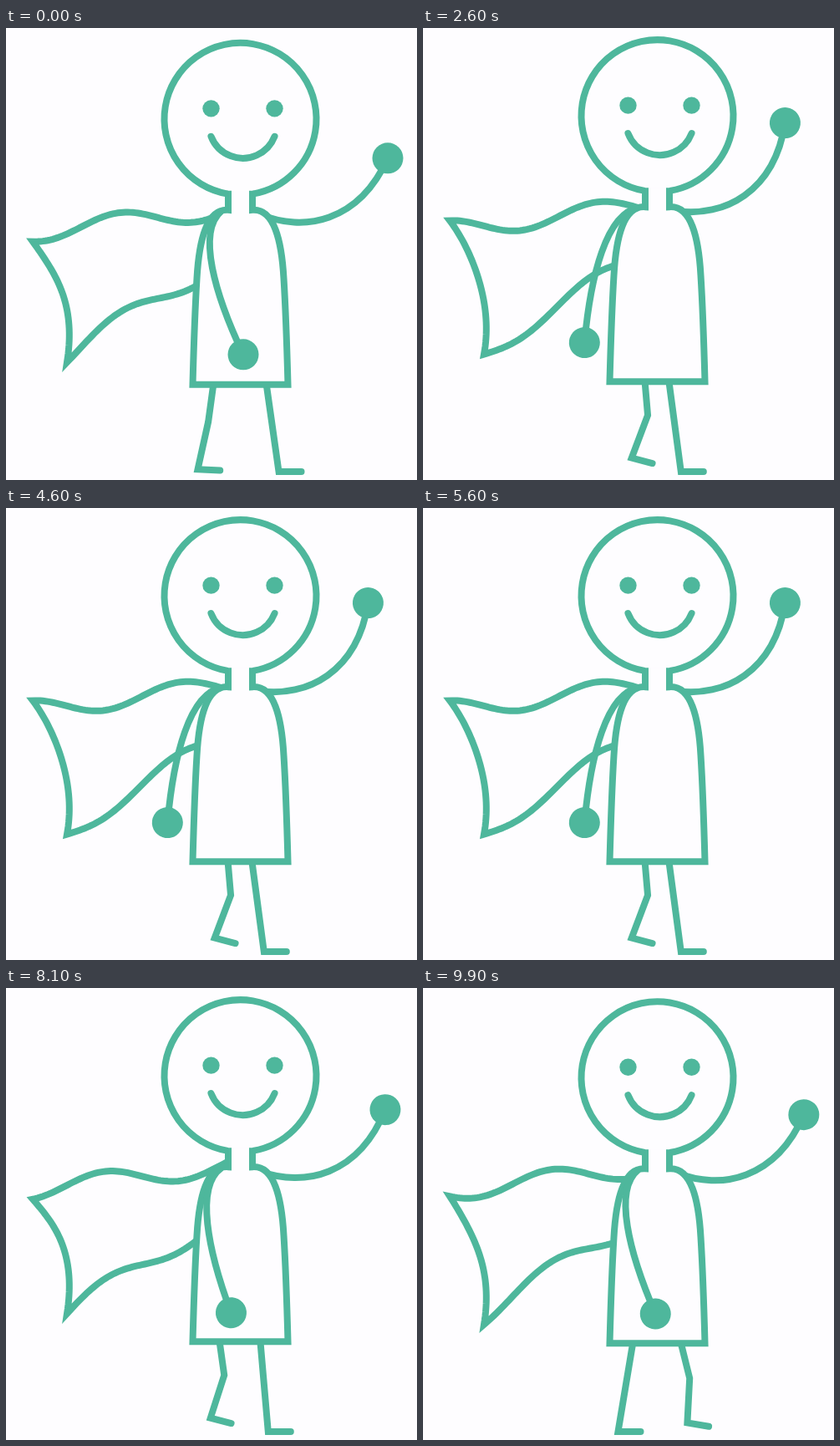
Recreate the animation shown at these times as an HTML page with a canvas. Size 492 by 541 pixels, loop 10000 ms.

```html
<!DOCTYPE html>
<html lang="en">
<head>
<meta charset="utf-8">
<title>Walking hero</title>
<style>
html, body { margin: 0; width: 100%; height: 100%; overflow: hidden; background: #fefdff; }
canvas { display: block; width: 492px; height: 541px; }
</style>
</head>
<body>
<canvas id="stage" width="492" height="541"></canvas>
<script>
const ctx = document.getElementById('stage').getContext('2d');
const INK = '#4eb79c', PAPER = '#fefdff';
const STEP = 100, CYCLE = 1000;
const { PI, cos, sin, max } = Math;
const rad = deg => deg * PI / 180;

function stroke(path, cap = 'butt') {
  ctx.lineCap = cap;
  ctx.stroke(path);
}

function dot(x, y, r) {
  ctx.beginPath();
  ctx.arc(x, y, r, 0, 2 * PI);
  ctx.fill();
}

function polyline(points) {
  const path = new Path2D();
  points.forEach(([x, y]) => path.lineTo(x, y));
  return path;
}

function cubic(a, b, c, d, t) {
  const u = 1 - t;
  return u * u * u * a + 3 * u * u * t * b + 3 * u * t * t * c + t * t * t * d;
}

const torso = new Path2D(
  'M266 195 V218 C240 216 231 255 228.5 300 C226 340 224.5 390 223.5 427 ' +
  'H337.5 C336.5 390 335 340 332.5 300 C330 255 321 216 295 218 V195');
const leftArm = new Path2D('M0 0 C-30 25 -8 100 26 172');
const rightArm = new Path2D('M0 0 C52 22 118 10 153 -67');

// Resting outline of the cape: top edge, left edge, bottom edge
const cape = [];
for (let x = 266; x > 32; x -= 3) cape.push([x, 245.5 - 0.125 * (x - 32)]);
for (let i = 0; i < 40; i++) {
  const t = i / 40;
  cape.push([cubic(32, 56, 85, 73, t), cubic(245.5, 275, 325, 394, t)]);
}
for (let x = 73; x <= 241; x += 3) {
  const u = (x - 73) / 153;
  cape.push([x, 394 - 95.5 * u - 12 * u * (1 - u)]);
}

function drawCape(angle) {
  stroke(polyline(cape.map(([x, y]) =>
    [x, y + 11.3 * cos(angle - rad(33 - 1.98 * (x - 32)))])));
}

function drawLeg(angle, bob, hipShift, footShift) {
  const swing = max(0, sin(angle));
  const c = cos(angle);
  const hip = [275 - 27 * c + hipShift, 427 + bob];
  const heel = [
    275 - 47 * c + 10 * swing * c - 2 * swing + footShift,
    531 - 24.5 * swing ** 1.1
  ];
  const knee = [
    hip[0] + 0.44 * (heel[0] - hip[0]) + 15 * swing,
    hip[1] + 0.44 * (heel[1] - hip[1])
  ];
  const tilt = rad(21 * swing);
  const length = 27 - 2 * swing;
  const toe = [heel[0] + length * cos(tilt), heel[1] + length * sin(tilt)];
  stroke(polyline([hip, knee, heel, toe]), 'round');
}

function drawArm(path, x, y, turn, handX, handY) {
  ctx.save();
  ctx.translate(x, y);
  ctx.rotate(turn);
  stroke(path);
  dot(handX, handY, 18.5);
  ctx.restore();
}

function drawHead() {
  const head = new Path2D();
  const gap = 0.166;
  head.arc(280.5, 109, 91, PI / 2 + gap, PI * 2.5 - gap);
  stroke(head);
  dot(245.5, 96.5, 10.2);
  dot(321.5, 96.5, 10.2);
  const smile = new Path2D();
  smile.arc(283.5, 115.2, 40.8, 0.37, PI - 0.37);
  stroke(smile, 'round');
}

function draw(time) {
  const angle = 2 * PI * (time % CYCLE) / CYCLE + rad(8);
  const bob = 4 * cos(2 * angle) - 4;
  ctx.fillStyle = PAPER;
  ctx.fillRect(0, 0, 492, 541);
  ctx.strokeStyle = INK;
  ctx.lineWidth = 8;
  ctx.lineJoin = 'miter';
  ctx.miterLimit = 10;

  drawLeg(angle, bob, 0, 0);
  drawLeg(angle + PI, bob, 10, 5);

  ctx.save();
  ctx.translate(0, bob);
  drawCape(angle);
  ctx.fillStyle = INK;
  drawArm(rightArm, 304, 223, rad(9.1 * (cos(angle) - 0.99)), 153, -67);
  ctx.fillStyle = PAPER;
  ctx.fill(torso);
  stroke(torso);
  ctx.fillStyle = INK;
  drawArm(leftArm, 258, 219, rad(17.8 * (0.99 - cos(angle))), 26, 172);
  drawHead();
  ctx.restore();
}

const start = performance.now();
function tick() {
  const time = performance.now() - start;
  draw(Math.floor(time / STEP) * STEP);
  requestAnimationFrame(tick);
}
tick();
</script>
</body>
</html>
```
